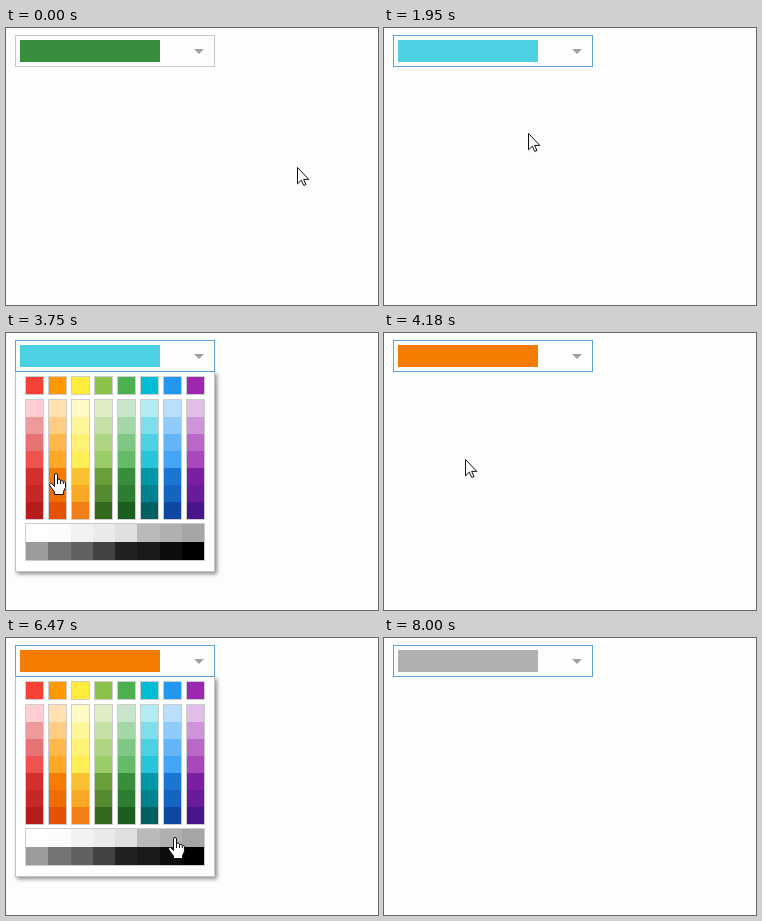
An HTML page for the animation above (8420 ms loop, 372 px wide and 277 px high).

```html
<!DOCTYPE html>
<html lang="en">
<head>
<meta charset="utf-8">
<title>Colour picker</title>
<style>
  html, body { margin: 0; width: 100%; height: 100%; overflow: hidden; background: #fdfdfd; }
  #stage { position: relative; width: 372px; height: 277px; overflow: hidden; background: #fdfdfd; }
  #stage div, #stage svg { position: absolute; box-sizing: border-box; }
  #field { left: 9px; top: 7px; width: 200px; height: 32px; border: 1px solid #c9c9c9; }
  #field.active { border-color: #5ba3d9; }
  #value { left: 4px; top: 4px; width: 140px; height: 22px; }
  #caret { left: 178px; top: 13px; border: 5px solid transparent; border-top-color: #a0a0a0; border-bottom: 0; }
  #caret.hover { border-top-color: #606060; }
  #popup { left: 9px; top: 39px; width: 200px; height: 200px; background: #fff;
    border: 1px solid #c4c4c4; border-top: 0; box-shadow: 2px 2px 4px rgba(0, 0, 0, .45); }
  .box { border: 1px solid #cdcdcd; }
  #stage svg { overflow: visible; width: 17px; height: 22px; fill: #fff; stroke: #101018; stroke-linejoin: round; }
</style>
</head>
<body>
<div id="stage">
  <div id="field"><div id="value"></div><div id="caret"></div></div>
  <div id="popup"></div>
  <svg id="arrow"><path d="M.5 .5V16.8L4.3 13.2L6.8 18.5L9 17.5L6.6 12.4H11.8Z"/></svg>
  <svg id="hand"><path d="M5.5 2Q5.5 .5 7 .5T8.5 2V7Q8.8 5.7 10 6T11.5 7.5V8Q12 7 13 7.3T14.3 9Q14.8 8.2 15.6 8.6T16.5 10V14.5L14.5 18.5V21.5H5.5V19L1 13Q0 11 1.5 10.5Q2.7 10.2 4 11.8L5.5 13.5Z"/><path fill="none" d="M5.5 13V3M8.5 6V11M11.5 8V11M14.3 9V11"/></svg>
</div>
<script>
const LOOP = 8420;
const $ = id => document.getElementById(id);
const [field, value, caret, popup, arrow, hand] =
  ['field', 'value', 'caret', 'popup', 'arrow', 'hand'].map($);

// Base hue first, then its shades from light to dark.
const hues = [
  'f44336 ffcdd2 ef9a9a e57373 ef5350 d32f2f c62828 b71c1c',
  'ff9800 ffe0b2 ffcc80 ffb74d ffa726 f57c00 ef6c00 e65100',
  'ffeb3b fff9c4 fff59d fff176 ffee58 fbc02d f9a825 f57f17',
  '8bc34a dcedc8 c5e1a5 aed581 9ccc65 689f38 558b2f 33691e',
  '4caf50 c8e6c9 a5d6a7 81c784 66bb6a 388e3c 2e7d32 1b5e20',
  '00bcd4 b2ebf2 80deea 4dd0e1 26c6da 0097a7 00838f 006064',
  '2196f3 bbdefb 90caf9 64b5f6 42a5f5 1976d2 1565c0 0d47a1',
  '9c27b0 e1bee7 ce93d8 ba68c8 ab47bc 7b1fa2 6a1b9a 4a148c'
];
const greys = [
  'ffffff fcfcfc f2f2f2 eaeaea e0e0e0 bababa b0b0b0 a5a5a5',
  '9c9c9c 747474 616161 424242 212121 1a1a1a 0d0d0d 000000'
];

function add(parent, x, y, w, h, color, cls = '') {
  const el = document.createElement('div');
  el.className = cls;
  el.style.cssText = `left:${x}px;top:${y}px;width:${w}px;height:${h}px;` + (color ? `background:#${color}` : '');
  return parent.appendChild(el);
}

hues.forEach((row, i) => {
  const [base, ...shades] = row.split(' ');
  const x = 9 + 23 * i;
  add(popup, x, 4, 19, 19, base, 'box');
  const column = add(popup, x, 27, 19, 121, '', 'box');
  shades.forEach((c, k) => add(column, 0, 17 * k, 17, 17, c));
});
const greyBox = add(popup, 9, 151, 180, 38, '', 'box');
greys.forEach((row, j) => row.split(' ').forEach((c, i) => {
  const x = Math.round(22.25 * i);
  add(greyBox, x, 18 * j, Math.round(22.25 * (i + 1)) - x, 18, c);
}));

// Pointer moves: first step, last step, hotspots spread evenly between.
const moves = [
  [0, 0, '291,139'],
  [120, 1080, '272,116 246,82 222,50 204,29 199,25 198,24 184,58 155,105'],
  [1220, 1640, '150,112 147,118 147,113 146,109'],
  [1950, 2980, '144,105 157,79 180,43 195,26 196,24 188,30 150,58 74,119'],
  [3100, 3230, '62,128 56,135'],
  [3610, 3750, '52,138 49,140'],
  [4180, 5120, '81,126 115,92 158,52 191,27 197,23 165,60 97,117'],
  [5260, 6220, '91,138 95,172 108,203 130,215 154,213 174,208 183,203 176,200'],
  [6340, 6470, '173,199 168,199'],
  [7200, 7200, '167,199'],
  [7580, 8000, '190,214 240,240 306,262 400,300']
];
const track = moves.flatMap(([from, to, path]) => {
  const pts = path.split(' ');
  const gap = (to - from) / Math.max(1, pts.length - 1);
  return pts.map((p, i) => {
    const [x, y] = p.split(',').map(Number);
    return { t: Math.floor((from + gap * i) / 10 + 1e-6) * 10, x, y };
  });
});

const states = [
  { t: 0, color: '#388e3c' },
  { t: 660, color: '#388e3c', open: true },
  { t: 1950, color: '#4dd0e1' },
  { t: 2530, color: '#4dd0e1', open: true },
  { t: 4180, color: '#f57c00' },
  { t: 4800, color: '#f57c00', open: true },
  { t: 7200, color: '#b0b0b0' }
];

const at = (list, t) => list.reduce((last, s) => s.t <= t ? s : last);
const show = (el, on) => { el.style.visibility = on ? 'visible' : 'hidden'; };

function draw(t) {
  const { x, y } = at(track, t);
  const { color, open } = at(states, t);
  const onButton = x >= 178 && x < 209 && y >= 7 && y < 39;
  const useHand = open || onButton;
  field.className = t >= 530 ? 'active' : '';
  caret.className = onButton ? 'hover' : '';
  value.style.background = color;
  show(popup, open);
  show(hand, useHand);
  show(arrow, !useHand);
  hand.style.transform = `translate(${x - 6}px,${y}px)`;
  arrow.style.transform = `translate(${x}px,${y}px)`;
}

const start = performance.now();
function tick() {
  draw((performance.now() - start) % LOOP);
  requestAnimationFrame(tick);
}
tick();
</script>
</body>
</html>
```
